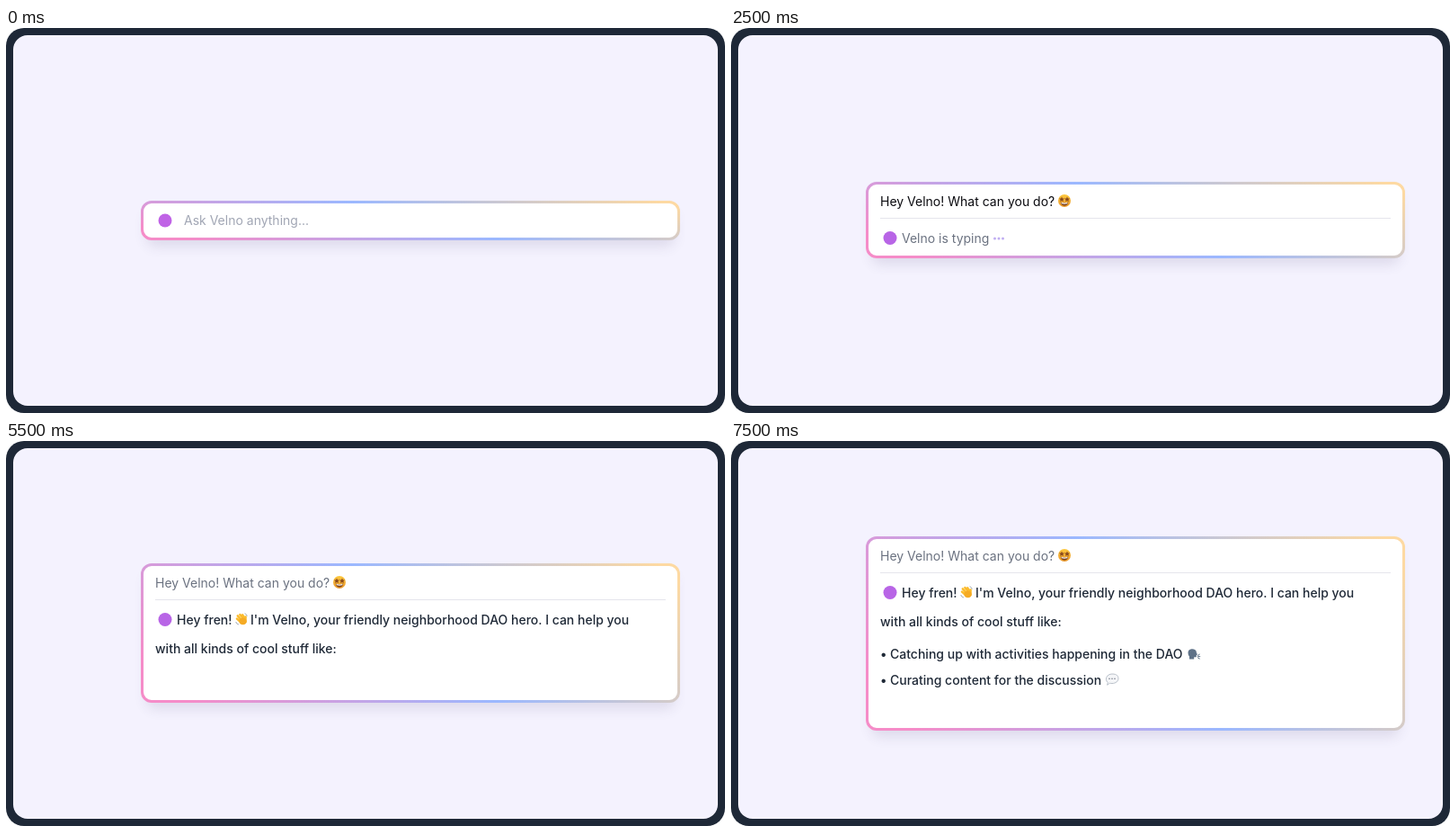
Write an HTML page that moves like this. It is 800 px wide and 428 px high and loops after 8000 ms.

```html
<!DOCTYPE html>
<html lang="en">
<head>
<meta charset="utf-8">
<title>Assistant chat</title>
<style>
  html, body { margin: 0; height: 100%; overflow: hidden; background: #fff; }
  svg { display: block; width: 100vw; height: 100vh; }
  text { font: 400 14px Inter, sans-serif; }
  .answer text { font-weight: 500; fill: #1f2937; }
  .line { fill: none; stroke-linecap: round; stroke-linejoin: round; }
</style>
</head>
<body>
<svg viewBox="0 0 800 428">
  <defs>
    <linearGradient id="rim" x1="-.05" y1=".5" x2="1.022" y2=".211">
      <stop offset="0" stop-color="#f58cc8"/>
      <stop offset=".5" stop-color="#9bb8ff"/>
      <stop offset="1" stop-color="#fdd9a2"/>
    </linearGradient>
    <linearGradient id="send">
      <stop offset="0" stop-color="#f07fbd"/>
      <stop offset="1" stop-color="#767fec"/>
    </linearGradient>
    <linearGradient id="gold" x2="0" y2="1">
      <stop offset="0" stop-color="#fdc93f"/>
      <stop offset="1" stop-color="#e9962a"/>
    </linearGradient>
    <filter id="blur" x="-10%" y="-50%" width="120%" height="200%">
      <feGaussianBlur stdDeviation="7"/>
    </filter>

    <g id="starstruck">
      <circle r="7" fill="url(#gold)"/>
      <path id="star" d="M-3-4.6l.9 2 2.1.2-1.6 1.4.5 2.1-1.9-1.1-1.9 1.1.5-2.1L-6-2.4l2.1-.2z" fill="#8a4a1c"/>
      <use href="#star" x="6"/>
      <path d="M-4.3 1.6Q0 2.7 4.3 1.6Q3.6 5.6 0 5.6T-4.3 1.6z" fill="#7a3f1a"/>
      <path d="M-3.6 2.1Q0 2.9 3.6 2.1L3.2 3.3Q0 4-3.2 3.3z" fill="#fff"/>
    </g>
    <g id="wave" class="line" stroke="#fbbb2c" stroke-width="2.5">
      <path d="M-4.2-3.6L1 2M-1.6-5L3 .5M1.2-4.6L4 0M-5-.4L0 4M4.6-2.6L4.4 3"/>
      <ellipse cx="1.6" cy="2.4" rx="3" ry="2.7" fill="#f5ab25" stroke="#f5ab25"/>
      <path d="M4-6.2Q6-5.4 6.2-3.6M-6.2 3.4Q-5.4 5.6-3.4 6" stroke="#8d98a5" stroke-width=".8"/>
    </g>
    <g id="speaker" fill="#5f7288">
      <path d="M-6.5-1.5C-6.5-7 3-7 3-1.6L4 .4 2.8 1V3.2H.2V5.5H-5V2.4Q-6.5.8-6.5-1.5z"/>
      <path class="line" d="M4.4 1.4L6.3.2M4.6 2.6H6.8M4.4 3.8L6.3 5" stroke="#5f7288"/>
    </g>
    <g id="bubble">
      <path d="M-5.4 6.2L-4.7 3.6C-9-.2-5.5-6 0-6S7-3.6 7-.8 4 4.5 0 4.5Q-1.5 4.5-2.6 4.2-3.6 5.6-5.4 6.2z" fill="#f5f6f8" stroke="#b3bac4" stroke-width=".9"/>
      <path class="line" d="M-3-.8h0M0-.8h0M3-.8h0" stroke="#6b7280" stroke-width="1.5"/>
    </g>
  </defs>

  <rect width="800" height="428" rx="20" fill="#1e2837"/>
  <rect x="8" y="8" width="784" height="412" rx="16" fill="#f4f2fe"/>
  <rect class="sized" data-shift="10" x="156" width="588" rx="10" fill="#3d3268" opacity=".12" filter="url(#blur)"/>
  <rect class="sized" data-shift="1.5" x="151.5" width="597" rx="10.5" fill="#fff" stroke="url(#rim)" stroke-width="3"/>

  <g id="content">
    <g data-from="0" data-to="3">
      <circle cx="177" cy="22" r="7.5" fill="#c063e6"/>
      <text x="198" y="27" fill="#a1a6b4" data-from="0" data-to="1">Ask Velno anything...</text>
      <text x="198" y="27" fill="#0b0b10" data-from="1" data-to="2">Hey Velno! Wh</text>
      <g data-from="2">
        <text x="198" y="27" fill="#0b0b10">Hey Velno! What can you do?</text>
        <use href="#starstruck" x="403" y="21"/>
      </g>
      <g data-from="1">
        <circle cx="726" cy="22" r="12" fill="url(#send)"/>
        <path class="line" d="M726 27.5V17M721.2 21.5L726 16.7l4.8 4.8" stroke="#fff" stroke-width="1.6"/>
      </g>
    </g>

    <g data-from="3">
      <text id="question" x="166" y="27">Hey Velno! What can you do?</text>
      <use href="#starstruck" x="371" y="21"/>
      <path d="M166 40.5H734" stroke="#e5e5ec"/>
      <circle cx="177" cy="62.5" r="7.5" fill="#b865e6"/>
      <g data-from="4" data-to="7">
        <text x="190" y="68" fill="#6b7280">Velno is typing</text>
        <g fill="#c0aef2">
          <circle cx="293.5" cy="63" r="1.5"/>
          <circle cx="298" cy="63" r="1.5"/>
          <circle cx="302.5" cy="63" r="1.5" data-from="5"/>
        </g>
      </g>
    </g>

    <g class="answer">
      <g data-from="8">
        <text x="190" y="68">Hey fren!</text>
        <use href="#wave" x="262" y="62"/>
        <text x="272" y="68">I'm Velno, your friendly neighborhood DAO hero. I can help you</text>
      </g>
      <text x="166" y="100" data-from="10">with all kinds of cool stuff like:</text>
      <g data-from="12">
        <text x="166" y="136">•</text>
        <text x="177" y="136">Catching up with activities happening in the DAO</text>
        <use href="#speaker" x="515" y="131"/>
      </g>
      <g data-from="14">
        <text x="166" y="165">•</text>
        <text x="177" y="165">Curating content for the discussion</text>
        <use href="#bubble" x="424" y="159"/>
      </g>
    </g>
  </g>
</svg>
<script>
  const STEP = 500, STEPS = 16;
  // [first step, card top, card bottom]
  const sizes = [[0, 192, 236], [3, 171, 256], [9, 154, 273], [11, 136, 291], [13, 122, 306], [15, 106, 322]];
  const content = document.getElementById('content');
  const question = document.getElementById('question');
  const cards = document.querySelectorAll('.sized');
  const timed = document.querySelectorAll('[data-from]');
  let shown = -1;

  function draw(step) {
    const [, top, bottom] = sizes.filter(([first]) => first <= step).pop();
    for (const card of cards) {
      card.setAttribute('y', top + +card.dataset.shift);
      card.setAttribute('height', bottom - top - 3);
    }
    content.setAttribute('transform', `translate(0 ${top})`);
    question.setAttribute('fill', step < 7 ? '#0b0b10' : '#6b7280');
    for (const item of timed) {
      const { from, to = STEPS } = item.dataset;
      item.style.display = step >= +from && step < +to ? '' : 'none';
    }
  }

  function tick(now) {
    const step = Math.floor(now / STEP) % STEPS;
    if (step !== shown) draw(shown = step);
    requestAnimationFrame(tick);
  }
  tick(performance.now());
</script>
</body>
</html>
```
